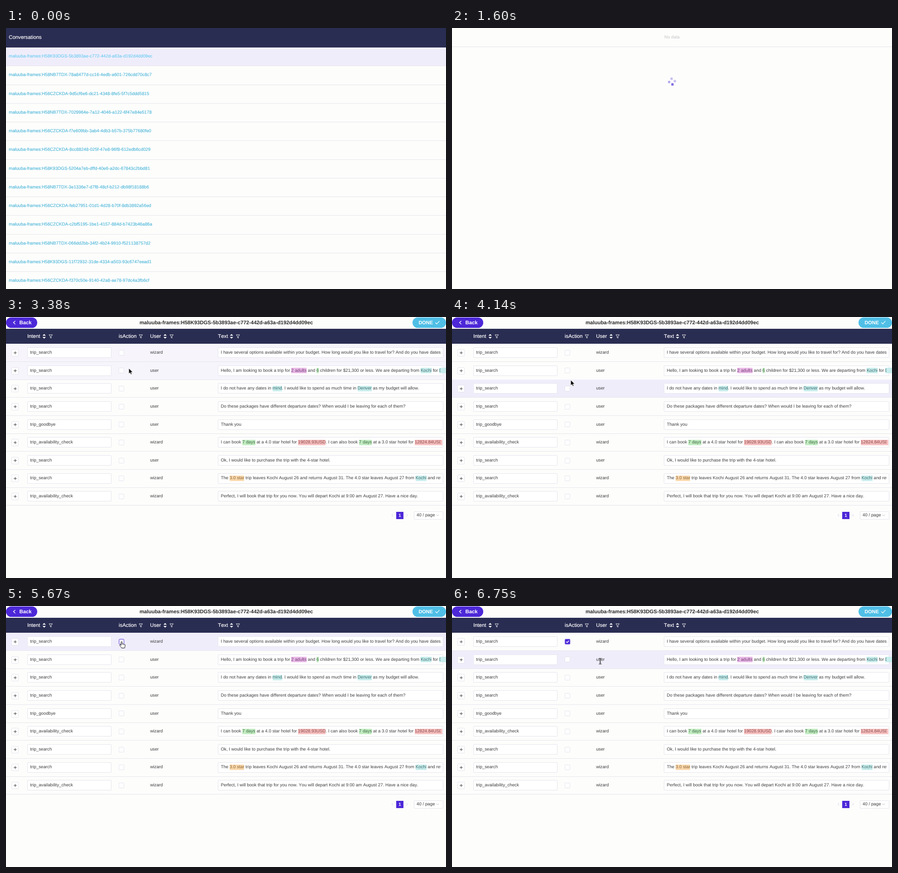
An HTML page that plays this animation: 972x576 px, repeating every 8000 ms.

```html
<!DOCTYPE html>
<html lang="en">
<head>
<meta charset="utf-8">
<title>Conversations</title>
<style>
  html, body { margin: 0; width: 100%; height: 100%; overflow: hidden; background: #fdfdfc; }
  #stage { position: relative; width: 972px; height: 576px; overflow: hidden;
    font: 9.72px/20px "Liberation Sans", Arial, sans-serif; color: #3e3e3e;
    font-kerning: none; text-rendering: geometricPrecision; }
  #stage div, svg { position: absolute; }
  .view, svg { left: 0; top: 0; width: 972px; height: 576px; }
  .text { white-space: pre; }
  .mid { transform: translateX(-50%); }
  .head { font-size: 11.34px; color: #fff; -webkit-text-stroke: .2px #fff; }
  .bold { font-size: 11.39px; font-weight: bold; color: #2a2a2a; }
  .white { color: #fff; }
  .link { color: #49b4d8; -webkit-text-stroke: .15px #49b4d8; }
  .hot { color: #6accf1; -webkit-text-stroke-color: #6accf1; }
  .bar { background: #2a2d52; }
  .hover { background: #f0edfb; }
  .line { background: #e6e5ea; }
  .box { background: #fff; border: 1px solid #e5e3ec; border-radius: 2px; box-sizing: border-box; }
  .pill { border-radius: 12px; }
  .violet { background: #4c28d8; }
  .sky { background: #50bfe6; }
  .back { color: transparent; }
  .text b { font-weight: normal; }
  .back b { padding: .5px 0; border-radius: 1px; }
  .back .p { background: #e9b9e6; } .front .p { color: #74407a; }
  .back .g { background: #c3ecc2; } .front .g { color: #3f6a45; }
  .back .t { background: #c8edec; } .front .t { color: #3f6d70; }
  .back .r { background: #f6c1c1; } .front .r { color: #8a4546; }
  .back .o { background: #fad9ae; } .front .o { color: #8c6436; }
</style>
</head>
<body>
<div id="stage"></div>
<script>
const LOOP = 8000, OPEN = 1030, READY = 1850;
const VIOLET = '#4c28d8';
const stage = document.getElementById('stage');

const box = (cls, x, y, w, h, id = '') =>
  `<div ${id && `id="${id}"`} class="${cls}" style="left:${x}px;top:${y}px;width:${w}px;height:${h}px"></div>`;
const text = (cls, x, y, str) =>
  `<div class="text ${cls}" style="left:${x}px;top:${y - 10}px">${str}</div>`;
const view = (id, html) => `<div class="view" id="${id}">${html}</div>`;
const svg = html => `<svg viewBox="0 0 972 576" fill="none">${html}</svg>`;
const path = (d, x, y, attrs) => `<path d="${d}" transform="translate(${x} ${y})" ${attrs}/>`;

// Conversation list
const users = { a: 'H58K93DGS', b: 'H58NB7TDX', c: 'H56CZCKDA' };
const conversations = [
  'a-5b3893ae-c772-442d-a63a-d192d4dd09ec', 'b-78a8477d-cc16-4edb-a601-726cdd70c8c7',
  'c-9d5cf6e6-dc21-4348-8fe5-5f7c5ddd5815', 'b-7029964e-7a12-4046-a122-6f47e84e5178',
  'c-f7e609bb-3ab4-4db3-b57b-375b77680fe0', 'c-8cc88248-025f-47e8-96f8-612edb6cd029',
  'a-5204a7eb-dffd-40e6-a2dc-67843c2bbd81', 'b-3e1336e7-d7f8-48cf-b212-db98f18188b6',
  'c-feb27951-01d1-4d28-b70f-8db3892a56ed', 'c-c2bf5195-1be1-4157-884d-b7423b46a86a',
  'b-066dd2bb-34f2-4b24-9910-f521138757d2', 'a-11f72932-31de-4334-a503-93c6747eead1',
  'c-f370c50e-9140-42a8-ae78-97dc4a3fb6cf'
].map(s => 'maluuba-frames:' + users[s[0]] + s.slice(1));

const list = box('bar', 0, 0, 972, 43) + text('head', 6.3, 21, 'Conversations') +
  box('hover', 0, 43, 972, 41) +
  conversations.map((name, i) =>
    text(i ? 'link' : 'link hot', 6.3, 63.2 + 41.25 * i, name) +
    box('line', 0, 83.4 + 41.25 * i, 972, 1)).join('');

// Loading state
const dots = [[0, -6.35], [6.35, 0], [0, 6.35], [-6.35, 0]];
const loading = text('mid', 486, 20.5, '<span style="color:#c5c5c5">No data</span>') +
  box('line', 0, 41, 972, 1) +
  svg(`<g transform="translate(486 118.2)"><g id="spinner">${dots.map(([x, y]) =>
    `<circle class="dot" cx="${x}" cy="${y}" r="2.8" fill="${VIOLET}" opacity=".3"/>`).join('')}</g></g>`);

// Message table; {x|words} marks a tagged entity
const turns = [
  ['trip_search', 'wizard', 'I have several options available within your budget. How long would you like to travel for? And do you have dates in mind?'],
  ['trip_search', 'user', 'Hello, I am looking to book a trip for {p|2 adults} and {g|6} children for $21,300 or less. We are departing from {t|Kochi} for {t|Denver}.'],
  ['trip_search', 'user', 'I do not have any dates in {t|mind}. I would like to spend as much time in {t|Denver} as my budget will allow.'],
  ['trip_search', 'user', 'Do these packages have different departure dates? When would I be leaving for each of them?'],
  ['trip_goodbye', 'user', 'Thank you'],
  ['trip_availability_check', 'wizard', 'I can book {g|7 days} at a 4.0 star hotel for {r|19028.93USD}. I can also book {g|7 days} at a 3.0 star hotel for {r|12824.84USD}'],
  ['trip_search', 'user', 'Ok, I would like to purchase the trip with the 4-star hotel.'],
  ['trip_search', 'wizard', 'The {o|3.0 star} trip leaves Kochi August 26 and returns August 31. The 4.0 star leaves August 27 from {t|Kochi} and returns'],
  ['trip_availability_check', 'wizard', 'Perfect, I will book that trip for you now. You will depart Kochi at 9:00 am August 27. Have a nice day.']
];
const tag = s => s.replace(/\{(\w)\|(.*?)\}/g, '<b class="$1">$2</b>');
const rowTop = i => 59 + 39.63 * i;

const row = ([intent, user, words], i) => {
  const y = rowTop(i), mid = y + 19.6, textY = y + 20, message = tag(words);
  return box('hover', 0, y, 972, 39.2, 'hover' + i) + box('line', 0, y + 39.1, 972, 1) +
    box('box', 12.3, mid - 7.6, 16, 16) + box('box', 47, mid - 11.5, 186, 23) +
    box('box', 249.2, mid - 5.8, 12, 12) + box('box', 468, mid - 11.5, 498, 23) +
    text('', 53.3, textY, intent) + text('', 318.4, textY, user) +
    text('back', 474.5, textY, message) +
    `<div class="text front" style="left:474.5px;top:${textY - 10}px;width:485px;overflow:hidden">${message}</div>`;
};

const sortIcon = x => path('M-3.7-1.4L0-5.2L3.7-1.4ZM-3.7 1.4L0 5.2L3.7 1.4Z', x, 42.6, 'fill="#fff"');
const filterIcon = x => path('M0 0H7.6L4.8 3.7V7.4L2.8 6.3V3.7Z', x, 39.2, 'stroke="#fff" stroke-width=".9"');
const plus = i => path('M-3.3 0H3.3M0-3.3V3.3', 20.3, rowTop(i) + 20, 'stroke="#3c3c3c" stroke-width="1"');
const check = 'M-2.8 0L-.8 2.1L3-2.3';

const table = box('bar', 0, 26, 972, 33) +
  [[47, 'Intent'], [249, 'isAction'], [318.3, 'User'], [468.3, 'Text']]
    .map(([x, name]) => text('head', x, 42.5, name)).join('') +
  turns.map(row).join('') +
  box('violet', 862, 429.5, 16, 16.5) + text('bold white mid', 870, 438, '<span style="font-size:9.7px">1</span>') +
  box('box', 900.5, 429, 65.5, 17.5) + text('', 907, 438, '40 / page') +
  svg([84.3, 351.5, 498.2].map(sortIcon).join('') + [95, 294, 362, 508.6].map(filterIcon).join('') +
    turns.map((_, i) => plus(i)).join('') +
    path('M2-2.6L-.9 0L2 2.6', 853, 437.5, 'stroke="#cfcbe0"') +
    path('M-2-2.6L.9 0L-2 2.6', 886.5, 437.5, 'stroke="#cfcbe0"') +
    path('M-2.7-1.3L0 1.4L2.7-1.3', 953.5, 437.5, 'stroke="#aaa" stroke-width=".9"') +
    `<g transform="translate(255.2 78.7)">
      <rect id="wave" x="-5.7" y="-5.7" width="11.4" height="11.4" rx="1.6" stroke="${VIOLET}"/>
      <rect id="ring" x="-5.4" y="-5.4" width="10.8" height="10.8" rx="1.6" stroke="${VIOLET}" fill="#fff"/>
      <rect id="fill" x="-5.8" y="-5.8" width="11.6" height="11.6" rx="1.8" fill="${VIOLET}"/>
      <path id="tick" d="${check}" stroke="#fff" stroke-width="1.6"/></g>`);

const toolbar = box('pill violet', 0, 1, 69, 22.5) + text('bold white', 29.5, 12.5, 'Back') +
  text('bold mid', 486.5, 13, conversations[0]) +
  box('pill sky', 898, 1, 74, 22.5) + text('bold white', 911.5, 12.5, '<span style="font-size:10.9px">DONE</span>') +
  svg(path('M2-3.6L-2 0L2 3.6', 18.5, 12.3, 'stroke="#fff" stroke-width="1.4"') +
    path('M-4.4 0L-1.3 3L4.4-3.4', 953, 12.3, 'stroke="#fff" stroke-width="1.2"'));

const pointer = svg(`<g id="cursor">
  <path id="arrow" d="M0 0V12.3L2.8 9.7L4.7 14L6.8 13.1L4.9 8.9H8.8Z" fill="#000" stroke="#fff" stroke-width=".9"/>
  <path id="hand" d="M-1.4 .8C-1.4-.8 1.1-.8 1.1 .8V5.2C1.6 4.3 3.2 4.5 3.3 5.6C4 4.8 5.3 5 5.4 6.1C6.2 5.5 7.4 5.9 7.4 7V9.8C7.4 11.5 6.5 12 6.3 13.8H-.3C-.7 12-3.6 9.6-4.4 8C-5 6.6-3.4 5.9-2.6 6.8L-1.4 8.1Z" fill="#fff" stroke="#000"/>
  <path id="beam" d="M-3-6.3Q-.2-6.3 0-5Q.2-6.3 3-6.3M0-5V5.3M-3 6.5Q-.2 6.5 0 5.2Q.2 6.5 3 6.5M-1.5 2.2H1.5" stroke="#111" stroke-width="1.1"/>
</g>`);

stage.innerHTML = view('list', list) + view('loading', loading) +
  view('detail', view('table', table) + toolbar) + pointer;

// Each step is [ms, value, easing to the next step]
const $ = id => document.getElementById(id);
const loop = (el, prop, steps) => {
  const all = [...steps, [LOOP, steps[steps.length - 1][1]]];
  if (all[0][0] > 0) all.unshift([0, all[0][1]]);
  el.animate(all.map(([ms, value, easing = 'linear']) => ({ offset: ms / LOOP, [prop]: value, easing })),
    { duration: LOOP, iterations: Infinity });
};
const show = (id, ...times) =>
  loop($(id), 'opacity', [[0, 0], ...times.map((ms, i) => [ms, 1 - i % 2])].map(s => [...s, 'step-end']));
const fade = (id, ...steps) => loop($(id), 'opacity', steps.map(s => [...s, 'ease']));

loop($('list'), 'opacity', [[0, 1, 'step-end'], [OPEN, 0]]);
show('loading', OPEN, READY);
show('detail', READY);
fade('table', [READY - 40, .5], [2050, 1]);

const turn = (READY - OPEN) * .3;
loop($('spinner'), 'transform', [[OPEN, 'rotate(0deg)'], [READY, `rotate(${turn}deg)`]]);
document.querySelectorAll('.dot').forEach((dot, i) => {
  const start = OPEN + 400 * i;
  if (start < READY) loop(dot, 'opacity', [[start, .3], [READY, .3 + .7 * (READY - start) / 1000]]);
});

fade('hover0', [READY, 0], [2050, 1], [3290, 1], [3590, 0], [4800, 0], [5130, 1], [6300, 1], [6600, 0]);
fade('hover1', [3290, 0], [3590, 1], [3820, 1], [4120, 0], [4580, 0], [4780, .6], [5060, 0], [6440, 0], [6740, 1]);
fade('hover2', [3820, 0], [4120, 1], [4580, 1], [4880, 0]);
for (let i = 3; i < turns.length; i++) $('hover' + i).style.opacity = 0;

const at = (x, y) => `translate(${x}px, ${y}px)`;
loop($('cursor'), 'transform', [
  [3060, at(306, 74), 'ease-in'], [3290, at(281, 100)], [3380, at(271.3, 113), 'ease-out'],
  [3850, at(262.2, 139)], [4530, at(262.2, 139), 'ease-in-out'],
  [4880, at(255.6, 79)], [6080, at(255.6, 79), 'ease-in-out'], [6450, at(327.4, 121.6)]
]);
show('arrow', 3060, 4850, 6140, 6400);
show('hand', 4850, 6140);
show('beam', 6400);

show('ring', 4850, 6140);
show('fill', 5710);
fade('tick', [5710, 0], [5850, 1]);
loop($('tick'), 'transform', [[5710, 'scale(0)', 'cubic-bezier(.12,.4,.29,1.46)'], [5950, 'scale(1)']]);
loop($('wave'), 'transform', [[5710, 'scale(1)', 'ease-in-out'], [6070, 'scale(1.6)']]);
loop($('wave'), 'opacity', [[0, 0, 'step-end'], [5710, .5, 'ease-in-out'], [6070, 0]]);
</script>
</body>
</html>
```
